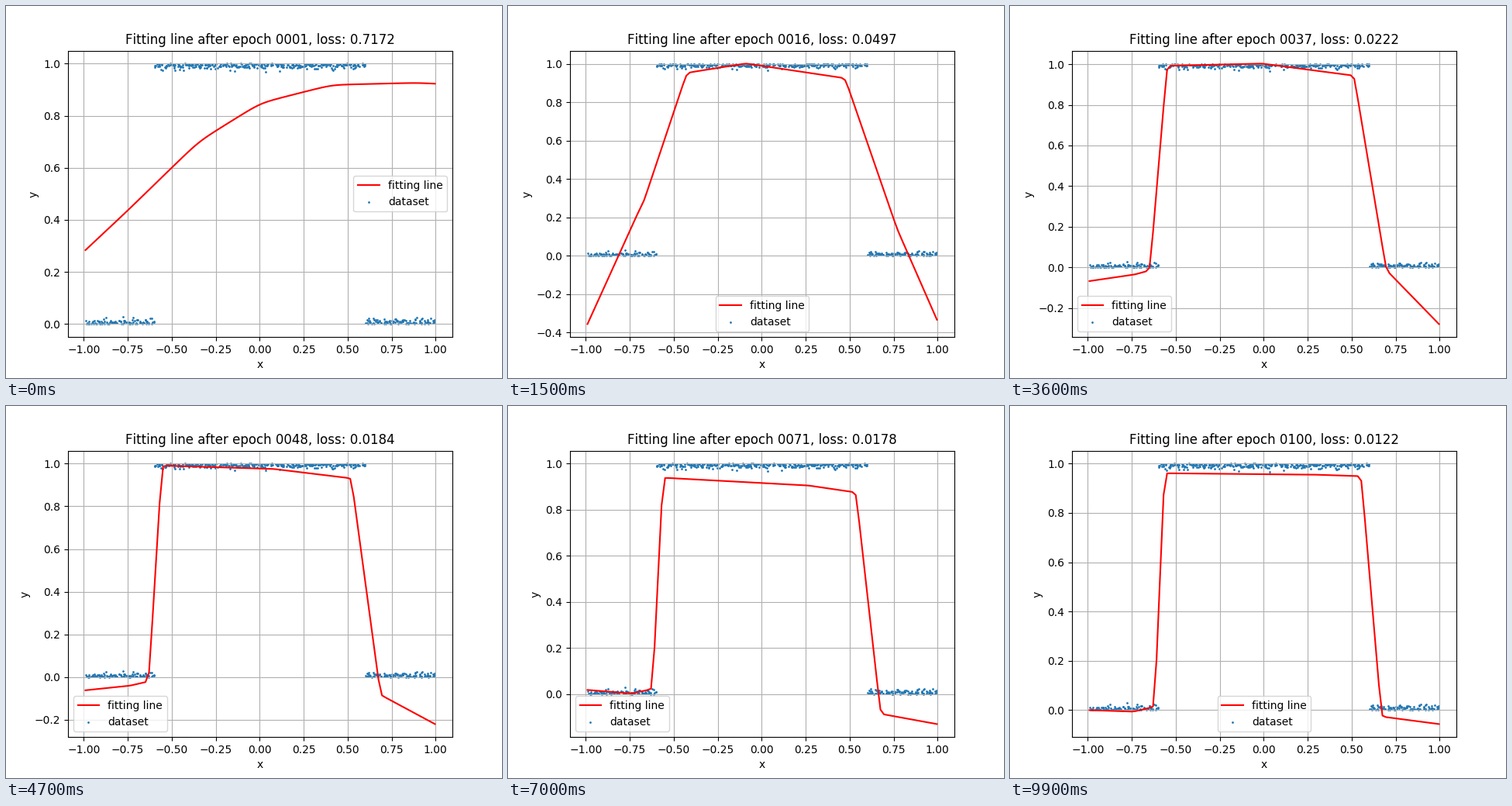
These frames come from a looping animation (640x480 px, 10 s). A matplotlib script:

```python
import numpy as np
import matplotlib.pyplot as plt
from matplotlib.animation import FuncAnimation

plt.rcParams["text.kerning_factor"] = 6

EPOCHS = 100
SETTLE = 16  # epoch at which the curve has become a box with two walls
X_MIN, X_MAX = -0.9901, 0.9963

KEYS = [1, SETTLE, 27, 48, 71, 87, 100]
LOSSES = [.7172, .0497, .0264, .0184, .0178, .0129, .0122]

# Corners of the first fit, and heights of the box's corners at KEYS[1:].
START_X = np.array([X_MIN, -.75, -.345, .005, .41, .6, .9, X_MAX])
START_Y = np.array([.284, .436, .702, .849, .9185, .9215, .9265, .923])
HEIGHTS = {
    "left end": [-.3555, -.073, -.0617, .0185, -.0175, 0],
    "left foot": [.25, -.03, -.04, .003, -.022, -.006],
    "left top": [.953, .993, .991, .939, .932, .961],
    "crown": [1.002, 1.0285, .975, .905, .925, .955],
    "right top": [.925, .955, .931, .875, .92, .949],
    "right foot": [.14, .05, -.083, -.085, -.041, -.026],
    "right end": [-.333, -.333, -.22, -.1295, -.0685, -.0565],
}

fig, ax = plt.subplots(figsize=(6.4, 4.8), dpi=100)
grid_x = np.linspace(X_MIN, X_MAX, 100)


def make_dataset(n=500):
    """Noisy samples of a box function: 1 for |x| < 0.6, else 0."""
    rng = np.random.default_rng(4)
    x = np.linspace(X_MIN, X_MAX, n) + rng.uniform(-.012, .012, n)
    noise = np.minimum(np.abs(rng.normal(0, .01, n)), .033)
    inside = np.abs(x) < 0.6
    return np.clip(x, X_MIN, X_MAX), np.where(inside, 1 - noise, noise)


def box_corners(epoch):
    """Corners of the box; its walls steepen as training goes on."""
    t = max(epoch - SETTLE, 0)
    xs = np.array([
        X_MIN,
        -.74 + .05 * np.exp(-t / 12),
        -.62 - .055 * np.exp(-(t / 25) ** 2),
        -.57 + .145 / (1 + t / 3.5),
        np.interp(t, [11, 59], [-.09, .3]),
        .5 + .00065 * t - .026 * np.exp(-t / 5),
        .656 + .114 / (1 + t / 12),
        X_MAX,
    ])
    ys = [np.interp(epoch, KEYS[1:], track) for track in HEIGHTS.values()]
    ys.insert(2, ys[1] + .02)  # the left wall starts just above the foot
    return xs, np.array(ys)


def soft_polyline(xs, ys, width):
    """Polyline as a sum of softplus ramps, so that corners are rounded."""
    slopes = np.diff(ys) / np.diff(xs)
    y = ys[0] + slopes[0] * (grid_x - xs[0])
    for corner, bend in zip(xs[1:-1], np.diff(slopes)):
        y += bend * width * np.logaddexp(0, (grid_x - corner) / width)
    return y


def fit_at(epoch):
    xs, ys = box_corners(epoch)
    u = min((epoch - 1) / (SETTLE - 1), 1) ** 0.7
    xs = START_X + (xs - START_X) * u
    ys = START_Y + (ys - START_Y) * u
    return soft_polyline(xs, ys, .003 + .027 * np.exp(-(epoch - 1) / 6))


data_x, data_y = make_dataset()


def draw(i):
    epoch = i + 1
    loss = np.exp(np.interp(epoch, KEYS, np.log(LOSSES)))
    ax.clear()
    ax.plot(grid_x, fit_at(epoch), color="red", label="fitting line")
    ax.scatter(data_x, data_y, s=1, label="dataset")
    ax.set_title(f"Fitting line after epoch {epoch:04d}, loss: {loss:.4f}")
    ax.set_xlabel("x")
    ax.set_ylabel("y")
    ax.grid(True)
    ax.legend(loc="best")


anim = FuncAnimation(fig, draw, frames=EPOCHS, interval=100,
                     init_func=lambda: None, repeat=True, repeat_delay=0)
plt.show()
```
